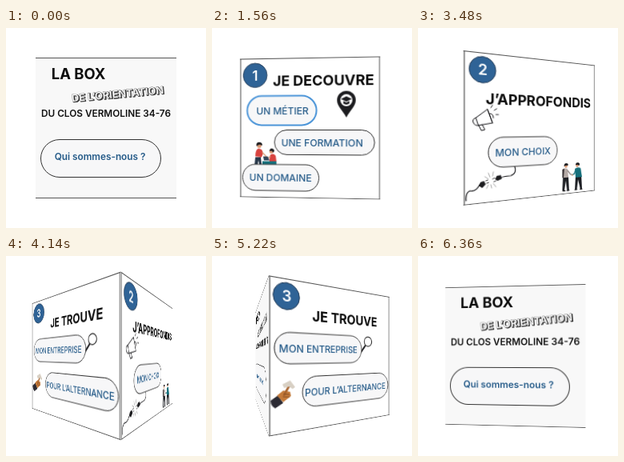
These frames come from a looping animation (250 by 250 pixels, 6420 ms). An HTML page:

```html
<!DOCTYPE html>
<html lang="fr">
<head>
<meta charset="utf-8">
<title>La box</title>
<style>
  html, body { margin: 0; width: 100%; height: 100%; overflow: hidden; background: #fff; }
  #stage { position: relative; width: 250px; height: 250px; overflow: hidden; perspective: 214.7px; }
  #cube { position: absolute; left: 37px; top: 37px; width: 176px; height: 176px; transform-style: preserve-3d; }
  .face { position: absolute; inset: 0; background: #fff; backface-visibility: hidden; }
  .face svg { position: absolute; left: 0; top: 0; display: block; }
  .soft { filter: blur(.3px); }
  text { font-family: Inter, "Liberation Sans", sans-serif; text-anchor: middle; }
  .title { font-weight: 700; fill: #0c0c0c; }
  .subtitle { font-weight: 600; fill: #111; }
  .label { font-weight: 500; fill: #245a88; }
  .strong { font-weight: 600; fill: #245a88; }
  .shade { font-weight: 700; font-size: 12.7px; }
</style>
</head>
<body>
<div id="stage"><div id="cube"></div></div>
<script>
const SIZE = 176, LOOP = 6420, STEPS = 107;
const INK = '#1c1c1f', BLUE = '#2f6396', TEAL = '#17707c', RED = '#d8433f', SKIN = '#d99a76';

const text = (x, y, size, str, cls) =>
  `<text class="${cls}" x="${x}" y="${y}" font-size="${size}">${str}</text>`;
const title = (x, y, str, size = 18) => text(x, y, size, str, 'title');
const line = (d, width = 1, color = INK) =>
  `<path d="${d}" fill="none" stroke="${color}" stroke-width="${width}" stroke-linecap="round" stroke-linejoin="round"/>`;
const shape = (d, fill) => `<path d="${d}" fill="${fill}"/>`;
const dot = (x, y, r, fill) => `<circle cx="${x}" cy="${y}" r="${r}" fill="${fill}"/>`;

function pill(x, y, w, h, str, o = {}) {
  const { size = 12.2, color = '#333', width = 1, base = y + h / 2 + 4.4, mid = x + w / 2, cls = 'label' } = o;
  return `<rect x="${x}" y="${y}" width="${w}" height="${h}" rx="${Math.min(h / 2, 24)}"
    fill="#f7f7f8" stroke="${color}" stroke-width="${width}"/>` + text(mid, base, size, str, cls);
}

const badge = (x, y, n) =>
  `<circle cx="${x}" cy="${y}" r="15.3" fill="${BLUE}" stroke="#27405c" stroke-width="1"/>` +
  `<text x="${x}" y="${y + 6.3}" font-size="17.5" font-weight="600" fill="#fff">${n}</text>`;

const tilted = (dx, dy, style) =>
  `<text class="shade" x="${103 + dx}" y="${50 + dy}" transform="rotate(-5.2 103 50)" ${style}>DE L’ORIENTATION</text>`;

const pin =
  shape('M134.5 75C130 66 123 61 123 53.5a11.5 11.5 0 0 1 23 0C146 61 139 66 134.5 75z', INK) +
  dot(134.5, 53.5, 7.4, '#fff') +
  shape('M127.8 52l6.7-3.2 6.7 3.2-6.7 3.2z M130.8 54.6l3.7 1.8 3.7-1.8v3.2q-3.7 2.2-7.4 0z', INK);

const readers =
  shape('M20 124q0-9 4-10 5 0 6 6l-2 5z', RED) +
  dot(25, 110.5, 2.8, SKIN) +
  shape('M21.5 111q-1-5 3.5-5 4 0 4 4l-4-1z', INK) +
  shape('M19 134l1-9h7l1 9h-3l-1-5-1 5z', '#27384a') +
  shape('M38 128l1-6q4-3 7 1l1 7h-9z', RED) +
  dot(40.5, 117.5, 2.6, SKIN) +
  shape('M38 117q1-4 4-3 4 2 1 5l-2-2z', INK) +
  line('M29 119l5 5M39 124l-4 3', 1.4, SKIN) +
  shape('M30 124h6l2 5h-7z', '#35485c') +
  shape('M29 130h18v4h-18z', TEAL);

const megaphone =
  line('M14 76l13-10 6 16-16 3z') +
  line('M14 76q-5 2-3 6 2 4 6 3') +
  line('M17 85l3 6 4-1-3-6M27 66l6 16M30 71q4 0 4 5') +
  line('M31 64l2-3M35 67l3-2M37 72h3', .9);

const cable =
  line('M60 135q3 9-5 11-8 0-13 2', 1.1) +
  line('M3 171q-1-9 4-11 7 2 11-6', 1.1) +
  shape('M43 144.5l-5 .5-2 4 3 2 5-2z', INK) +
  shape('M17 155l2-4 4-1 2 4-4 4z', INK) +
  line('M35.5 147.5l-2.5 .8M37 151l-2.5 .8M25 150l2.4-.8M26 153l2.4-.8', .8) +
  line('M30 146l-2-5M33 145l1-5M28 148l-4-3M31 155l1 4M34 154l3 4M28 155l-2 4', .8, '#999');

const handshake =
  shape('M126 153h8l1 18h-3l-2-13-2 13h-3z', '#1d1f24') +
  shape('M125 143q4-3 8 0l1 11h-8z', '#b5aaa6') +
  shape('M125 143l3-1-1 12h-2z', '#3a3436') +
  dot(130.5, 138.6, 2.4, SKIN) + shape('M127.5 139q0-4 3-4 4 0 3 3l-4 0z', INK) +
  shape('M145 153h9l1 18h-3l-3-13-2 13h-3z', '#1d1f24') +
  shape('M144 143q5-3 9 0l2 12h-10z', TEAL) +
  dot(147.5, 138.6, 2.4, SKIN) + shape('M145 138q0-3 3-3 4 0 3 4l-3-1z', INK) +
  line('M133 145l4 5 3 1', 1.5, '#8f8583') + line('M145 145l-2 5-3 1', 1.8, TEAL) +
  dot(140, 151.3, 1.1, SKIN) +
  line('M126 171.5h3M132 171.5h3M144 171.5h3M152 171.5h3', 1.3);

const lens =
  line('M131.5 73.5L124.5 82', 2.4) +
  '<circle cx="136" cy="68" r="6.6" fill="#fff" stroke="#222" stroke-width="1.2"/>';

const hammer =
  shape('M2 137l8-5 6 9-9 5q-5-3-5-9z', '#2b2a33') +
  shape('M9 132l7-5 8 2 1 5-9 6z', '#c47a3a') +
  line('M17 132L23 122', 2.6, '#a8642f') +
  shape('M15 120l9-4 6 8-3 2-4-3-6 1z', '#d8d0c4') +
  line('M17 131l6 1M16 134l7 1', .8, '#7d4822');

const faces = [
  title(53.5, 26.8, 'LA BOX', 18.4) +
  tilted(1, .9, 'fill="#333" stroke="#333" stroke-width=".8"') +
  tilted(0, 0, 'fill="#fff" stroke="#777" stroke-width=".4"') +
  text(88, 74.3, 11.8, 'DU CLOS VERMOLINE 34-76', 'subtitle') +
  pill(6.5, 102.5, 150, 47, 'Qui sommes-nous ?', { size: 11.8, mid: 80.5, base: 127.8, cls: 'strong' }),

  badge(19.7, 21.3, 1) + title(105.5, 35.5, 'JE DECOUVRE') + pin + readers +
  pill(9.5, 47.5, 88, 37, 'UN MÉTIER', { color: '#4a94d8', width: 2, mid: 54.5, base: 71 }) +
  pill(44.5, 90.5, 124.5, 31, 'UNE FORMATION', { mid: 104, base: 110.8 }) +
  pill(3.5, 134, 97, 33, 'UN DOMAINE', { mid: 52, base: 155 }),

  badge(21.6, 20, 2) + title(97, 60, 'J’APPROFONDIS') + megaphone + cable + handshake +
  pill(28, 99, 89.5, 36, 'MON CHOIX', { mid: 72, base: 121.7 }),

  badge(20, 20, 3) + title(102, 45.7, 'JE TROUVE') + lens + hammer +
  pill(6, 61, 119, 36, 'MON ENTREPRISE', { mid: 64.5, base: 84.2 }) +
  pill(39, 112.5, 134, 36.5, 'POUR L’ALTERNANCE', { mid: 105, base: 135.6 })
];

const edges = line(`M0 .5H${SIZE}M0 ${SIZE - .5}H${SIZE}`, 1, '#555');
const sides = line(`M1 0V${SIZE}M${SIZE - 1} 0V${SIZE}`, 1.6, '#8a8a8a');

const cube = document.getElementById('cube');
faces.forEach((art, i) => {
  const face = document.createElement('div');
  face.className = 'face';
  face.style.transform = `rotateY(${-90 * i}deg) translateZ(${SIZE / 2}px)`;
  if (i === 0) face.style.background = '#f8f8f8';
  face.innerHTML = `<svg width="${SIZE}" height="${SIZE}" viewBox="0 0 ${SIZE} ${SIZE}">
    <g class="soft">${art}</g>${i ? sides : ''}${edges}</svg>`;
  cube.append(face);
});

const pose = angle => ({ transform: `translateZ(${-SIZE / 2}px) rotateY(${angle}deg)` });
cube.animate([pose(0), pose(360)], { duration: LOOP, iterations: Infinity, easing: `steps(${STEPS}, end)` });
</script>
</body>
</html>
```
